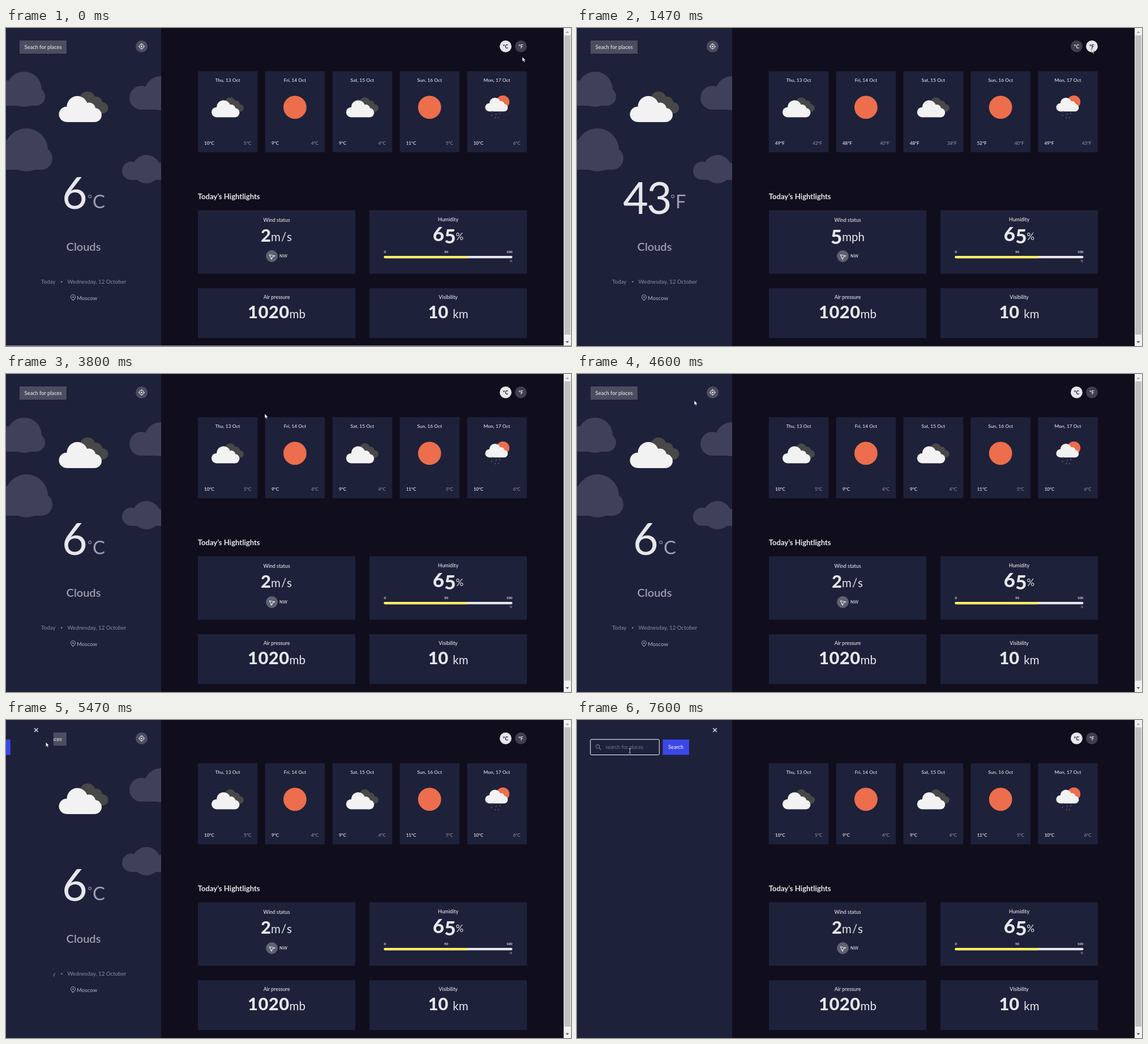
Animation, 998 px wide and 561 px high, one loop 8 s. Source, as an HTML page:

```html
<!DOCTYPE html>
<html lang="en">
<head>
<meta charset="utf-8">
<title>Weather</title>
<style>
html, body { margin: 0; width: 100%; height: 100%; overflow: hidden; background: #100e1d; }
svg { display: block; width: 998px; height: 561px; }
text { font-family: Lato, "Open Sans", sans-serif; fill: #e7e7eb; white-space: pre; }
.mid { text-anchor: middle; }
.end { text-anchor: end; }
.card { fill: #1e213a; }
.dim { fill: #a09fb1; }
.soft { fill: #8d8c9f; }
.sky { fill: #40405a; }
.line { fill: none; stroke: #e7e7eb; }
</style>
</head>
<body>
<svg viewBox="0 0 998 561">
  <defs>
    <clipPath id="side"><rect width="274" height="561"/></clipPath>
    <g id="front" fill="#f2f2f2">
      <circle cx="13.5" cy="32.3" r="13.5"/><circle cx="32.5" cy="18.5" r="18.5"/>
      <circle cx="53" cy="23" r="11.5"/><circle cx="63" cy="33.5" r="12.5"/>
      <rect x="13.5" y="25" width="49.5" height="21" rx="2"/>
    </g>
    <g id="clouds">
      <g fill="#484848">
        <circle cx="50.5" cy="6" r="14"/><circle cx="66" cy="11.5" r="10.5"/>
        <circle cx="77" cy="21" r="10"/><rect x="42" y="10" width="35" height="21"/>
      </g>
      <use href="#front"/>
    </g>
  </defs>

  <rect width="998" height="561" fill="#100e1d"/>
  <g clip-path="url(#side)">
    <rect class="card" width="274" height="561"/>
    <g class="sky">
      <circle cx="32" cy="108" r="31"/><circle cx="53" cy="121" r="16"/><circle cx="-2" cy="114" r="22"/><rect y="108" width="53" height="29"/>
      <circle cx="239" cy="123" r="21"/><circle cx="274" cy="115" r="30"/><rect x="239" y="115" width="35" height="29"/>
      <circle cx="36" cy="215" r="38"/><circle cx="62" cy="230" r="20"/><circle cx="-2" cy="222" r="25"/><rect y="215" width="62" height="35"/>
      <circle cx="221" cy="251.8" r="16"/><circle cx="248" cy="249" r="25"/><circle cx="270" cy="253" r="15"/><rect x="221" y="250" width="53" height="17.8"/>
    </g>
    <rect x="25" y="24" width="83" height="23" fill="#15172a" opacity=".7"/>
    <rect x="24" y="22" width="83" height="23.5" fill="#4c4d60"/>
    <text class="mid" x="65.5" y="36.7" font-size="9.3" font-weight="500">Seach for places</text>
    <circle cx="239.5" cy="32.5" r="10.5" fill="#4c4d60"/>
    <g class="line" stroke-width="1.2">
      <circle cx="239.5" cy="32.5" r="3.8"/>
      <path d="M239.5 27v2M239.5 36v2M234 32.5h2M243 32.5h2"/>
    </g>
    <circle cx="239.5" cy="32.5" r="1.6" fill="#e7e7eb"/>
    <use href="#clouds" transform="translate(93.5 120)"/>
    <text id="temp" class="mid" x="137"></text>
    <text class="mid dim" x="137" y="393" font-size="20" font-weight="600">Clouds</text>
    <g class="soft" font-size="9.75">
      <text class="soft" x="62" y="451">Today</text>
      <circle cx="98.3" cy="447.7" r="1.3"/>
      <text class="soft" x="108.5" y="451">Wednesday, 12 October</text>
    </g>
    <path d="M118.5 480.5c-2.4-2.4-4-4-4-5.800a4 4 0 0 1 8 0c0 1.800-1.600 3.400-4 5.800z" fill="none" stroke="#a09fb1" stroke-width="1.100"/>
    <circle cx="118.500" cy="474.700" r="1.300" fill="#a09fb1"/>
    <text class="dim" x="125" y="479.500" font-size="9.600" font-weight="600">Moscow</text>

    <g id="search">
      <rect class="card" width="274" height="561"/>
      <path class="line" d="M240.300 14.500l6.500 6.500M246.800 14.500l-6.500 6.500" stroke-width="1.400"/>
      <rect id="field" x="23.700" y="34.200" width="121.600" height="27.300" rx="2" fill="#1e213a"/>
      <g fill="none" stroke="#74768a" stroke-width="1.100"><circle cx="36.700" cy="46.700" r="3.100"/><path d="M39 49l3.300 3.500"/></g>
      <text x="50.500" y="51" font-size="9.150" style="fill:#74768a">search for places</text>
      <rect id="caret" x="50.500" y="43" width="1" height="10" fill="#fff"/>
      <rect x="151.500" y="34.500" width="46.500" height="27" fill="#3c47e9"/>
      <text class="mid" x="174.600" y="50.700" font-size="9" font-weight="600">Search</text>
    </g>
  </g>

  <g class="mid" font-size="8.700" font-weight="700">
    <circle id="dotC" cx="882.500" cy="32.400" r="10.400"/><text id="btnC" x="882.500" y="35.800">°C</text>
    <circle id="dotF" cx="909.500" cy="32.400" r="10.400"/><text id="btnF" x="909.500" y="35.800">°F</text>
  </g>
  <g id="days"></g>

  <text x="338.700" y="302" font-size="13.100" font-weight="700">Today’s Hightlights</text>
  <g class="card">
    <rect x="339" y="321.500" width="278" height="112"/><rect x="642" y="321.500" width="278" height="112"/>
    <rect x="339" y="459" width="278" height="88"/><rect x="642" y="459" width="278" height="88"/>
  </g>
  <g class="mid" font-size="8.900" font-weight="500">
    <text x="478" y="342.300">Wind status</text><text x="781" y="340.800">Humidity</text>
    <text x="478" y="478">Air pressure</text><text x="781" y="478">Visibility</text>
  </g>
  <text id="wind" class="mid" x="478"></text>
  <text id="humid" class="mid" x="781"></text>
  <text id="press" class="mid" x="478"></text>
  <text id="vis" class="mid" x="781"></text>
  <circle cx="469.500" cy="402.500" r="10.400" fill="#5f6072"/>
  <path class="line" d="M465.300 400l9.700 2-4.300 1.700-1.700 4.300z" stroke-width="1.200" stroke-linejoin="round"/>
  <text x="483" y="405.300" font-size="7.700" font-weight="500">NW</text>
  <g font-size="6" font-weight="700">
    <text x="667.500" y="396.600">0</text><text class="mid" x="777.500" y="396.600">50</text>
    <text class="end" x="894.500" y="396.600">100</text><text class="end dim" x="894.500" y="412.700">%</text>
  </g>
  <rect x="667.500" y="402" width="227" height="4.300" rx="2.100" fill="#e7e7eb"/>
  <path d="M815 402h-145.400a2.150 2.150 0 0 0 0 4.300H815z" fill="#ffec65"/>

  <rect x="985" width="13" height="561" fill="#f1f1f1"/>
  <rect x="986" y="13" width="11" height="528" fill="#c1c1c1"/>
  <path d="M988.500 8.800h6l-3-3.300z" fill="#a3a3a3"/>
  <path d="M988.500 552.500h6l-3 3.300z" fill="#505050"/>
  <rect id="edge" y="560" width="998" height="1" fill="#88878f"/>

  <path id="arrow" d="M0 0V8.200L1.900 6.500 3.200 9.400 4.700 8.700 3.400 5.900H6z" fill="#fff" stroke="#000" stroke-width=".5"/>
  <path id="beam" class="line" d="M91.500 50.500h1.200l.6.600.6-.6h1.200M93.300 51v7M91.500 58.500h1.200l.6-.6.6.6h1.200" stroke-width=".8"/>
</svg>
<script>
const LOOP = 8000, TICK = 1000 / 15;
const $ = id => document.getElementById(id);
const dayNames = ['Thu, 13', 'Fri, 14', 'Sat, 15', 'Sun, 16', 'Mon, 17'];
const metric = { temp: '6', wind: '2', high: [10, 9, 9, 11, 10], low: [5, 4, 4, 5, 6] };
const imperial = { temp: '43', wind: '5', high: [49, 48, 48, 52, 49], low: [42, 40, 38, 40, 43] };

// pointer tip: time, x, y
const path = [
  [0, 912, 51], [200, 911, 42], [466, 908, 28], [670, 908, 28], [800, 908.7, 36],
  [2470, 908.7, 36], [2733, 876.5, 34.7], [3540, 876.5, 34.7], [3600, 800, 50],
  [3800, 457, 70], [3930, 300, 75], [4070, 168, 62], [4266, 249, 46], [4470, 249, 46],
  [4870, 120, 48], [5070, 35, 42], [5333, 70, 39], [5466, 70, 39], [5800, 181, 45]
];

const clouds = '<use href="#clouds" transform="translate(24.2 51) scale(.655)"/>';
const sun = '<circle cx="52.7" cy="63.5" r="20.4" fill="#ec6e4c"/>';
const drops = [[44, 70], [51, 74.5], [57.5, 73.5], [43, 76.5], [49.5, 80.500], [55, 80.500]]
  .map(([x, y]) => `M${x + 1} ${y}l-1.300 2.500`).join('');
const rain = `<circle cx="63.3" cy="54" r="11.500" fill="#ec6e4c"/>
  <use href="#front" transform="translate(32 46.500) scale(.53)"/>
  <path d="${drops}" stroke="#57575c" stroke-width="1.500"/>`;
const icons = [clouds, sun, clouds, sun, rain];

$('days').innerHTML = dayNames.map((name, i) => `
  <g transform="translate(${338.8 + i * 118.9} 76.400)">
    <rect class="card" width="105.500" height="142.800"/>
    <text class="mid" x="52.700" y="18.300" font-size="8.450" font-weight="500">${name} Oct</text>
    ${icons[i]}
    <text id="high${i}" x="11.300" y="130" font-size="7.900" font-weight="600"></text>
    <text id="low${i}" class="end dim" x="94.400" y="130" font-size="7.900"></text>
  </g>`).join('');

// One line of text from parts: [text, size, baseline, extra attributes]
function mix(id, parts) {
  let base = 0;
  $(id).innerHTML = parts.map(([text, size, y, more = '']) => {
    const span = `<tspan font-size="${size}" dy="${y - base}" ${more}>${text}</tspan>`;
    base = y;
    return span;
  }).join('');
}

const HEAVY = 'font-weight="800"', GAP = 'dx="1"';
mix('humid', [['6', 35, 375.5, HEAVY], ['5', 35, 380.3, HEAVY], ['%', 17, 374]]);
mix('press', [['1020', 31, 512, HEAVY + ' letter-spacing=".4"'], ['mb', 20.5, 511.5]]);
mix('vis', [['10', 31, 512, HEAVY], ['km', 20.5, 511.5, 'dx="8"']]);

function showWeather(data, unit) {
  const two = data.temp.length > 1;
  mix('temp', [
    [data.temp, 77, two ? 328 : 318.5, two ? 'letter-spacing="-3"' : ''],
    ['°', 18, 307, 'class="dim" ' + GAP],
    [unit, 33, 317.700, 'class="dim" ' + GAP]
  ]);
  mix('wind', data === metric
    ? [['2', 31, 376.8, HEAVY], windUnit(unit)]
    : [['5', 35, 380.7, HEAVY], windUnit(unit)]);
  dayNames.forEach((_, i) => {
    $('high' + i).textContent = `${data.high[i]}°${unit}`;
    $('low' + i).textContent = `${data.low[i]}°${unit}`;
  });
  for (const u of ['C', 'F']) {
    const on = u === unit;
    $('dot' + u).style.fill = on ? '#e7e7eb' : '#403f4c';
    $('btn' + u).style.fill = on ? '#110e3c' : '#e7e7eb';
  }
}

function windUnit(unit) {
  return unit === 'C'
    ? ['m/s', 20.5, 376, 'letter-spacing="1.3"']
    : ['mph', 20.5, 376];
}

function pointerAt(t) {
  const i = path.findIndex(p => p[0] > t);
  if (i < 0) return path[path.length - 1].slice(1);
  const [t0, x0, y0] = path[i - 1], [t1, x1, y1] = path[i];
  const k = (t - t0) / (t1 - t0);
  return [x0 + (x1 - x0) * k, y0 + (y1 - y0) * k];
}

const show = (id, on) => $(id).style.display = on ? '' : 'none';
let shown = '';

function draw(t) {
  const unit = t >= 1130 && t < 3260 ? 'F' : 'C';
  const data = t >= 1460 && t < 3330 ? imperial : metric;
  const key = unit + data.temp;
  if (key !== shown) showWeather(data, unit);
  shown = key;

  const focus = t >= 5995;
  const slide = Math.min(1, Math.max(0, (t - 5400) / 400));
  show('search', t >= 5460);
  $('search').setAttribute('transform', `translate(${-274 * (1 - slide) ** 2} 0)`);
  $('field').setAttribute('stroke', focus ? '#fff' : '#616475');
  show('caret', focus && Math.floor((t - 5995) / 534) % 2 === 0);
  show('edge', t < 1195);
  show('arrow', !focus);
  show('beam', focus);
  $('arrow').setAttribute('transform', `translate(${pointerAt(t)})`);
}

const start = performance.now();
function loop() {
  const t = (performance.now() - start) % LOOP;
  draw(Math.floor(t / TICK) * TICK);
  requestAnimationFrame(loop);
}
loop();
</script>
</body>
</html>
```
